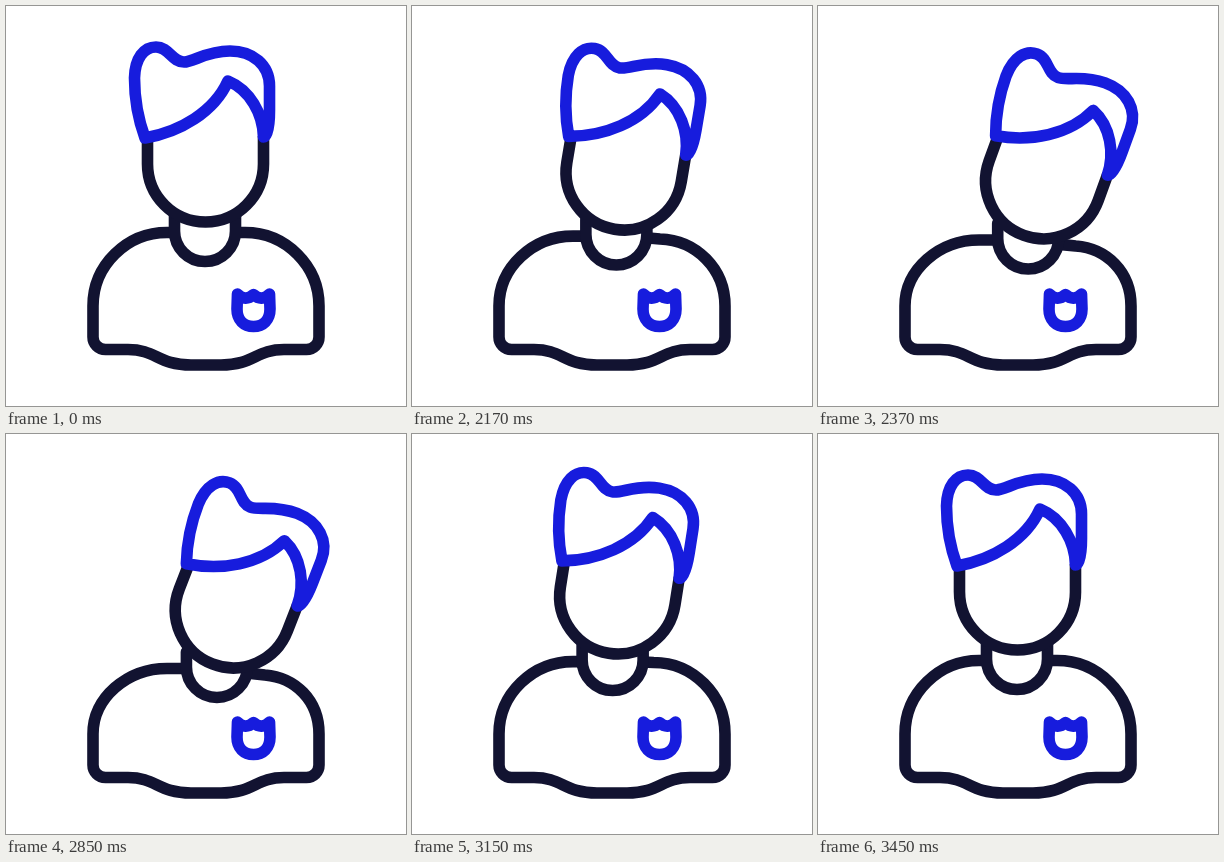
Recreate the animation shown at these times as an HTML page. Size 400x400 px, loop 3.47 s.

```html
<!DOCTYPE html>
<html lang="en">
<head>
<meta charset="utf-8">
<title>Head tilt</title>
<style>
  html, body { margin: 0; width: 100%; height: 100%; overflow: hidden; background: #fff; }
  svg { display: block; width: 100%; height: 100%; }
  path { fill: none; stroke: #121331; stroke-width: 11.6; stroke-linecap: round; stroke-linejoin: round; }
  .blue { stroke: #171cdd; }
  #face { fill: #fff; stroke-linecap: butt; }
</style>
</head>
<body>
<svg viewBox="0 0 400 400">
  <path id="body"/>
  <path id="neck" d="M168.500 210V225a30.500 30.500 0 0 0 61 0V210"/>
  <path class="blue" d="M231.500 288Q239.500 296 247.500 288.500Q255.500 296 263.500 288L264 303C264 314 257 320.500 247.500 320.500S231 314 231 303Z"/>
  <g id="head">
    <path id="face" d="M141.500 132V158a58 58 0 0 0 116 0V130"/>
    <path class="blue" d="M139 132C131 110 128.500 90 128.500 72C129 52 138 41 150 41C163 41 166 56 178 56C188 56 200 45 224 45C247 45 263.500 59 263.500 80V104C263.500 120 261 131 257.500 131C257 108 244 84 222 75C208 106 174 126 139 132Z"/>
  </g>
</svg>
<script>
const LOOP = 3470;
const [body, neck, head] = ['body', 'neck', 'head'].map(id => document.getElementById(id));

// Cubic bezier easing with y handles at 0 and 1
function ease(t, x1, x2) {
  if (t <= 0) return 0;
  if (t >= 1) return 1;
  let lo = 0, hi = 1, u;
  for (let i = 0; i < 24; i++) {
    u = (lo + hi) / 2;
    const x = 3 * (1 - u) ** 2 * u * x1 + 3 * (1 - u) * u * u * x2 + u ** 3;
    if (x < t) lo = u; else hi = u;
  }
  return u * u * (3 - 2 * u);
}

function bodyPath(k) {
  const left = 226.5 + 8 * k, right = 226.5 + 13 * k;
  return `M${165 + 12 * k} ${left}H161C121 ${left} 87 ${259 + 5 * k} 87 300
    V331A12.500 12.500 0 0 0 99.500 343.500H122C150 343.500 152 359 185 359
    H215C248 359 250 343.500 278 343.500H300.500A12.500 12.500 0 0 0 313 331
    V300C313 ${260 + 6 * k} ${280 + 9 * k} ${right + 4 * k} ${239 + 20 * k} ${right + 1.5 * k}
    L${235 + 10 * k} ${right}`;
}

function draw(now) {
  const t = now % LOOP;
  const tilt = ease((t - 2005) / 520, 0.33, 0.25);
  const back = (t - 2830) / 540;
  const shift = tilt - ease(back, 0.3, 0.25);
  const slide = tilt - ease(back, 0.3, 0.45);
  const turn = tilt - ease((t - 2835) / 625, 0.33, 0.55);
  body.setAttribute('d', bodyPath(shift));
  neck.setAttribute('transform', `translate(${12 * shift} ${8 * shift})`);
  head.setAttribute('transform',
    `translate(${28 * slide} ${18 * slide}) rotate(${21.3 * turn} 199.5 158)`);
  requestAnimationFrame(draw);
}
requestAnimationFrame(draw);
</script>
</body>
</html>
```
